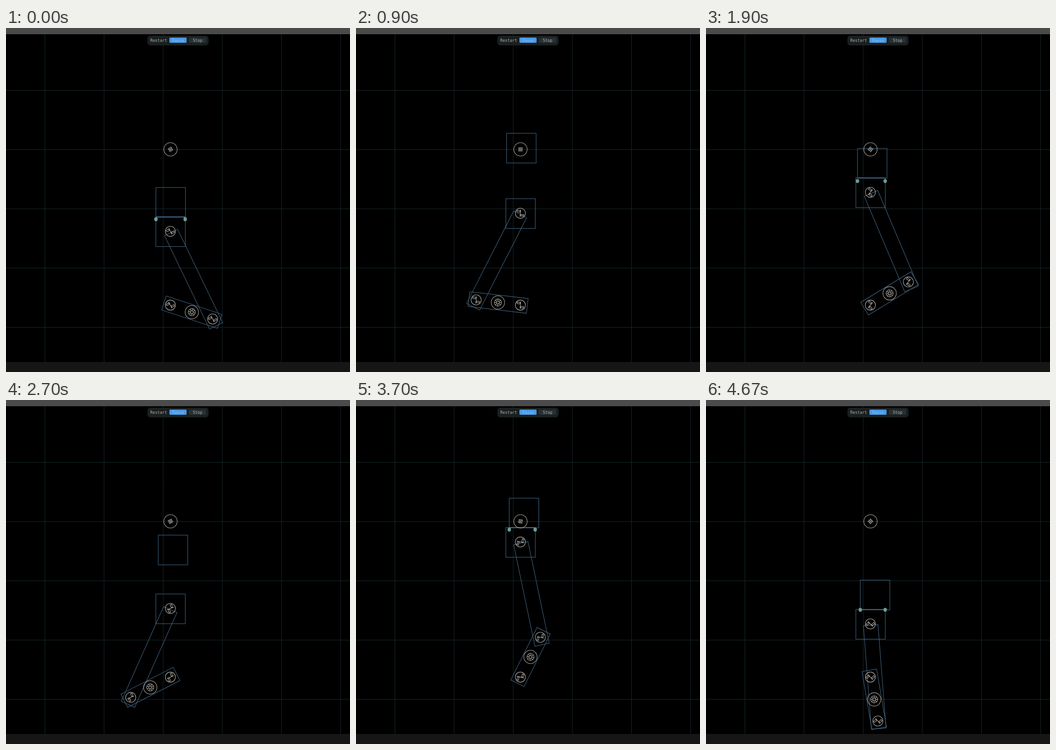
Animation of 720x720 px, one loop 4770 ms. Source, as an HTML page:

```html
<!DOCTYPE html>
<html lang="en">
<head>
<meta charset="utf-8">
<title>Crank and slider</title>
<style>
  html, body { margin: 0; width: 100%; height: 100%; overflow: hidden; background: #000; }
  svg { display: block; width: 100vw; height: 100vh; }
  text { font: 8.3px "DejaVu Sans Mono", monospace; }
  .body { fill: none; stroke: #466a88; }
  .icon { fill: none; stroke: #aaa69f; stroke-width: 1.1; }
</style>
</head>
<body>
<svg id="stage" viewBox="0 0 720 720">
  <rect width="720" height="720"/>
  <g id="grid" stroke="#18272c"></g>
  <path d="M335.5 40V180" stroke="#10181a" stroke-dasharray="1 5"/>
  <rect width="720" height="13" fill="#4b4b4c"/>
  <rect y="699" width="720" height="21" fill="#161616"/>
  <rect x="296" y="16" width="128" height="20.5" rx="6" fill="#1a1f20"/>
  <rect x="342" y="20" width="36" height="11" rx="2" fill="#4a98e4"/>
  <rect x="383" y="20" width="36" height="11" rx="2" fill="#273032"/>
  <g text-anchor="middle" fill="#b0b0ae">
    <text x="319.5" y="28.5">Restart</text>
    <text x="360.3" y="28.5" fill="#86c0f0">Pause</text>
    <text x="401" y="28.5">Stop</text>
  </g>
</svg>
<script>
const stage = document.getElementById('stage');
const LOOP = 4770;
const PIVOT = { x: 344, y: 580 };
const CRANK = 93.2, ROD = 203.8;
const RAD = Math.PI / 180;

// Crank angle in degrees over time; the motor turns at a nearly even speed.
const TURN = [[0, 18.2], [900, -173.3], [1900, -391.4], [2700, -567.1],
  [3300, -693.4], [4100, -873.4], [4670, -999.7]];

function add(tag, attrs, parent = stage) {
  const el = document.createElementNS('http://www.w3.org/2000/svg', tag);
  set(el, attrs);
  return parent.appendChild(el);
}

function set(el, attrs) {
  for (const key in attrs) el.setAttribute(key, attrs[key]);
}

function place(el, x, y, angle = 0) {
  el.setAttribute('transform', `translate(${x} ${y}) rotate(${angle})`);
}

function icon(radius, path, attrs = {}) {
  const g = add('g', { class: 'icon' });
  add('circle', { r: radius }, g);
  const mark = add('path', { d: path, ...attrs }, g);
  return { move(x, y, angle) { place(g, x, y); place(mark, 0, 0, angle); } };
}

const grid = document.getElementById('grid');
for (let i = 0; i < 6; i++) add('path', { d: `M${81.5 + 123.75 * i} 13V720` }, grid);
for (let i = 0; i < 5; i++) add('path', { d: `M0 ${130.5 + 124 * i}H720` }, grid);

const block = add('rect', { class: 'body', width: 61.8, height: 62.2 });
const slider = add('rect', { class: 'body', x: 313.7, width: 61.6, height: 62.2 });
const rod = add('rect', { class: 'body', x: 2, y: -15.3, width: ROD + 13.3, height: 30.6 });
const crank = add('rect', { class: 'body', x: -14.4, y: -15.5, width: 123, height: 31 });

const contact = add('g', { fill: '#6a9c94' });
const edge = add('path', { stroke: '#4a7cac' }, contact);
const dots = [0, 1].map(() => add('ellipse', { rx: 3.6, ry: 4.2 }, contact));

const HINGE = 'M2.4 -7.4h3.2v6.6h-3.2zM-5.6 .8h3.2v6.6h-3.2zM-7.5 0h15';
const hinges = [0, 1, 2].map(() => icon(10.6, HINGE));

let gear = 'M7.4 0A7.4 7.4 0 1 1 -7.4 0A7.4 7.4 0 1 1 7.4 0M3 0A3 3 0 1 1 -3 0A3 3 0 1 1 3 0';
for (let i = 0; i < 8; i++) {
  const c = Math.cos(i * 45 * RAD), s = Math.sin(i * 45 * RAD);
  gear += `M${3 * c} ${3 * s}L${7.4 * c} ${7.4 * s}`;
}
const motor = icon(14, gear);
const laser = icon(14, 'M-4.5 -3h9M-4.5 0h9M-4.5 3h9', { 'stroke-width': 1.7 });

function crankAngle(t) {
  const i = Math.max(1, TURN.findIndex(([time]) => time >= t));
  const [t0, a0] = TURN[i - 1], [t1, a1] = TURN[i];
  return a0 + (a1 - a0) * (t - t0) / (t1 - t0);
}

function sliderY(deg) {
  const a = deg * RAD;
  return PIVOT.y + CRANK * Math.sin(a) - Math.sqrt(ROD ** 2 - (CRANK * Math.cos(a)) ** 2);
}

// The picture advances in steps: about 15 per second at first, then 10.
function stepTime(t) {
  if (t < 130) return 0;
  if (t < 600) return 130 + Math.floor((t - 130) * 7 / 470) * 470 / 7;
  if (t >= 4670) return 4670;
  if (t >= 4230 && t < 4300) return 4230;
  return Math.floor(t / 100) * 100;
}

function draw(t) {
  const deg = crankAngle(t), a = deg * RAD;
  const pin = { x: PIVOT.x + CRANK * Math.cos(a), y: PIVOT.y + CRANK * Math.sin(a) };
  const y = sliderY(deg), top = y - 30.3;
  const spin = 60 + 0.0353 * t;

  // The block rides the slider from bottom dead centre, then flies freely.
  const phase = 90 - ((90 - deg) % 360 + 360) % 360;
  const resting = y - 91.7;
  const flying = 177.7 + 0.01213 * (phase + 114) ** 2;
  const left = 313.8 + 0.00155 * t + 9e-8 * t * t;
  set(block, { x: left, y: Math.min(resting, flying) });
  set(slider, { y: top });

  const touching = resting <= flying;
  contact.setAttribute('visibility', touching ? 'visible' : 'hidden');
  if (touching) {
    const dotY = top + Math.max(0, sliderY(deg + 3.7) - y) + 0.3;
    set(edge, { d: `M${left} ${top}H375` });
    set(dots[0], { cx: left, cy: dotY });
    set(dots[1], { cx: 375, cy: dotY });
  }

  const rodAngle = Math.atan2(pin.y - y, pin.x - PIVOT.x) / RAD;
  place(rod, PIVOT.x + 0.6, y + 0.6, rodAngle);
  place(crank, PIVOT.x + 0.2, PIVOT.y, deg);

  hinges[0].move(PIVOT.x, PIVOT.y, spin - 176);
  hinges[1].move(pin.x, pin.y, spin - 176);
  hinges[2].move(PIVOT.x, y, spin - 176);
  motor.move(PIVOT.x + 47.3 * Math.cos(a), PIVOT.y + 47.3 * Math.sin(a), spin);
  laser.move(344.3, 254, spin);
}

const start = performance.now();
function tick() {
  draw(stepTime((performance.now() - start) % LOOP));
  requestAnimationFrame(tick);
}
tick();
</script>
</body>
</html>
```
